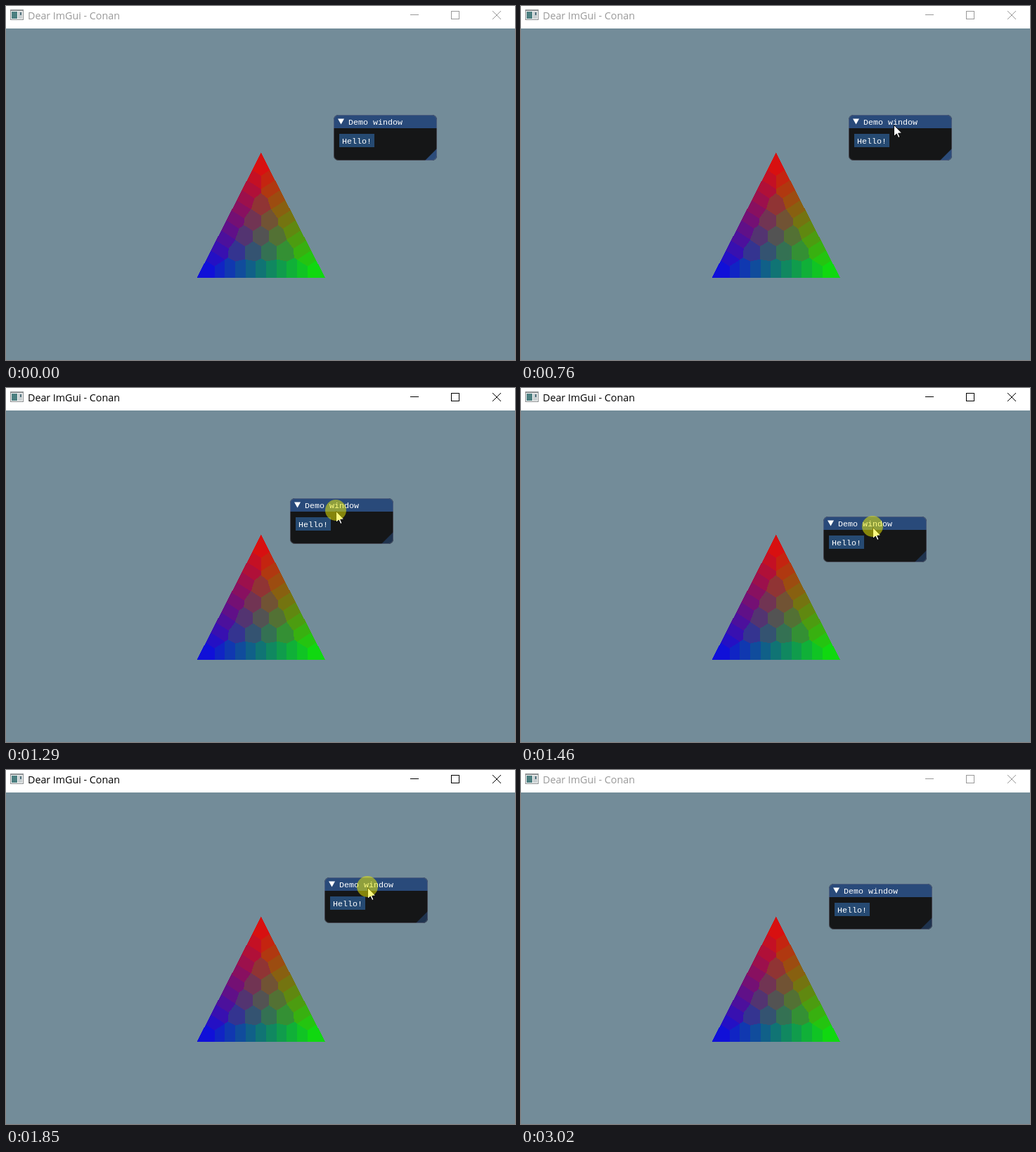
Recreate the animation shown at these times as an HTML page with a canvas. Size 724 by 504 pixels, loop 3.1 s.

```html
<!DOCTYPE html>
<html lang="en">
<head>
<meta charset="utf-8">
<title>Dear ImGui - Conan</title>
<style>
  html, body { margin: 0; width: 100%; height: 100%; overflow: hidden; background: #738c99; }
  canvas { display: block; }
</style>
</head>
<body>
<canvas id="stage" width="724" height="504"></canvas>
<script>
const LOOP = 3100, BLUR = 3020;
const FIRST = 125, STEP = 77.6;
const PRESS = 9, RELEASE = 24, LEAVE = 31;
const LAG = .35;                 // the dragged window trails the pointer, in steps
const GRAB = [64, 14];           // where the pointer holds the window

// Key points: [step, x, y].
const enterKeys = [[0, 599, 400], [6, 528, 172], [8, 530, 169]];
const dragKeys = [
  [9, 466, 155], [12, 437, 144], [15, 404, 157], [17, 430, 183],
  [19, 464, 177], [20, 467, 168], [22, 453, 153], [24, 438, 162]
];
const leaveKeys = [[24, 502, 176], [27, 562, 346], [31, 604, 534]];

const ctx = document.getElementById('stage').getContext('2d');

// Smooth curve through the keys, at rest at both ends.
function follow(keys, k) {
  const last = keys.length - 1;
  k = Math.min(Math.max(k, keys[0][0]), keys[last][0]);
  const i = Math.min(keys.findLastIndex(key => key[0] <= k), last - 1);
  const a = keys[i], b = keys[i + 1], span = b[0] - a[0], u = (k - a[0]) / span;
  const slope = (j, c) => j === 0 || j === last ? 0
    : (keys[j + 1][c] - keys[j - 1][c]) / (keys[j + 1][0] - keys[j - 1][0]);
  const s = u * u * (3 - 2 * u);
  return [1, 2].map(c => Math.round(
    a[c] + (b[c] - a[c]) * s
    + span * u * (1 - u) * ((1 - u) * slope(i, c) - u * slope(i + 1, c))));
}

function pointerAt(k) {
  if (k < PRESS) return follow(enterKeys, k);
  if (k >= RELEASE) return follow(leaveKeys, k);
  return follow(dragKeys, k + LAG).map((v, c) => v + GRAB[c]);
}

function fillRect(color, x, y, w, h) {
  ctx.fillStyle = color;
  ctx.fillRect(x, y, w, h);
}

function fillPolygon(color, points) {
  ctx.beginPath();
  points.forEach(([x, y]) => ctx.lineTo(x, y));
  ctx.closePath();
  ctx.fillStyle = color;
  ctx.fill();
}

function text(str, x, y, font, color) {
  ctx.font = font;
  ctx.fillStyle = color;
  ctx.fillText(str, x, y);
}

// Colour weights of evenly spaced points on a triangle inset from the edges.
function ring(inset, perSide) {
  const far = 1 - 2 * inset, points = [];
  for (let side = 0; side < 3; side++) for (let i = 0; i < perSide; i++) {
    const u = i / perSide, w = [inset, inset, inset];
    w[side] = far + (inset - far) * u;
    w[(side + 1) % 3] = inset + (far - inset) * u;
    points.push(w);
  }
  return points;
}

// RGB triangle reduced to the nearest of a few flat colours.
function makeTriangle() {
  const left = 271.5, top = 209, w = 182.5, h = 178;
  const tile = document.createElement('canvas');
  tile.width = 724;
  tile.height = 504;
  const tc = tile.getContext('2d');
  const palette = [...ring(.065, 10), ...ring(.21, 3), [1 / 3, 1 / 3, 1 / 3]];
  for (let y = top; y < top + h; y++) for (let x = Math.floor(left); x < left + w; x++) {
    const r = 1 - (y + .5 - top) / h, g = (x + .5 - left) / w - r / 2, b = 1 - r - g;
    if (Math.min(r, g, b) < 0) continue;
    let best, min = Infinity;
    for (const p of palette) {
      const d = Math.hypot(r - p[0], g - p[1], b - p[2]);
      if (d < min) { min = d; best = p; }
    }
    tc.fillStyle = `rgb(${best.map(v => Math.round(v * 248)).join()})`;
    tc.fillRect(x, y, 1, 1);
  }
  return tile;
}
const triangle = makeTriangle();

function drawTitleBar(active) {
  const ink = active ? '#000' : '#999';
  fillRect('#fff', 0, 0, 724, 32);
  fillRect('#8c9092', 6, 5, 19, 15);
  fillRect('#f4f4f4', 7, 7, 17, 12);
  fillRect('#4c7f80', 8, 8, 8, 10);
  fillRect('#c9d0d2', 17, 8, 6, 10);
  fillRect('#50707c', 20, 9, 2, 4);
  text('Dear ImGui - Conan', 31, 19, '14.27px "Open Sans", "Noto Sans", sans-serif', ink);
  fillRect(ink, 575, 12, 12, 1);
  ctx.strokeStyle = ink;
  ctx.lineWidth = 1;
  ctx.strokeRect(633.5, 7.5, 11, 11);
  ctx.beginPath();
  ctx.moveTo(692, 7);
  ctx.lineTo(704, 19);
  ctx.moveTo(704, 7);
  ctx.lineTo(692, 19);
  ctx.stroke();
}

function drawWindow([x, y], gripColor) {
  const font = '11.67px "Liberation Mono", "DejaVu Sans Mono", monospace';
  ctx.save();
  ctx.translate(x, y);
  ctx.save();
  ctx.beginPath();
  ctx.roundRect(0, 0, 147, 65, 7);
  ctx.clip();
  fillRect('#151617', 0, 0, 147, 65);
  fillRect('#294a7a', 0, 0, 147, 19);
  fillPolygon(gripColor, [[147, 48], [147, 65], [130, 65]]);
  ctx.restore();
  ctx.beginPath();
  ctx.roundRect(.5, .5, 146, 64, 6.5);
  ctx.strokeStyle = 'rgba(110,110,128,.5)';
  ctx.lineWidth = 1;
  ctx.stroke();
  fillPolygon('#fff', [[6, 5.6], [15, 5.6], [10.5, 13.4]]);
  text('Demo window', 21, 14, font, '#fff');
  fillRect('#264a72', 8, 27, 50, 19);
  text('Hello!', 12, 41, font, '#fff');
  ctx.restore();
}

function drawPointer([x, y], pressed) {
  ctx.save();
  ctx.translate(x, y);
  fillPolygon('#fff', [[.5, .5], [.5, 16.5], [4.3, 13], [6.8, 18.5], [9, 17.5], [6.6, 12.2], [11.7, 12]]);
  ctx.strokeStyle = '#000';
  ctx.lineWidth = .9;
  ctx.stroke();
  if (pressed) {
    ctx.beginPath();
    ctx.arc(0, -1, 15, 0, Math.PI * 2);
    ctx.fillStyle = 'rgba(246,244,0,.5)';
    ctx.fill();
  }
  ctx.restore();
}

function draw(t) {
  const k = Math.floor((t - FIRST) / STEP);
  fillRect('#738c99', 0, 0, 724, 504);
  drawTitleBar(k >= PRESS && t < BLUR);
  ctx.drawImage(triangle, 0, 0);
  drawWindow(follow(dragKeys, k), k < PRESS ? '#2c4c7a' : '#1f334e');
  if (k >= 0 && k < LEAVE) drawPointer(pointerAt(k), k >= PRESS && k < RELEASE);
}

const start = performance.now();
function tick() {
  draw((performance.now() - start) % LOOP);
  requestAnimationFrame(tick);
}
tick();
</script>
</body>
</html>
```
